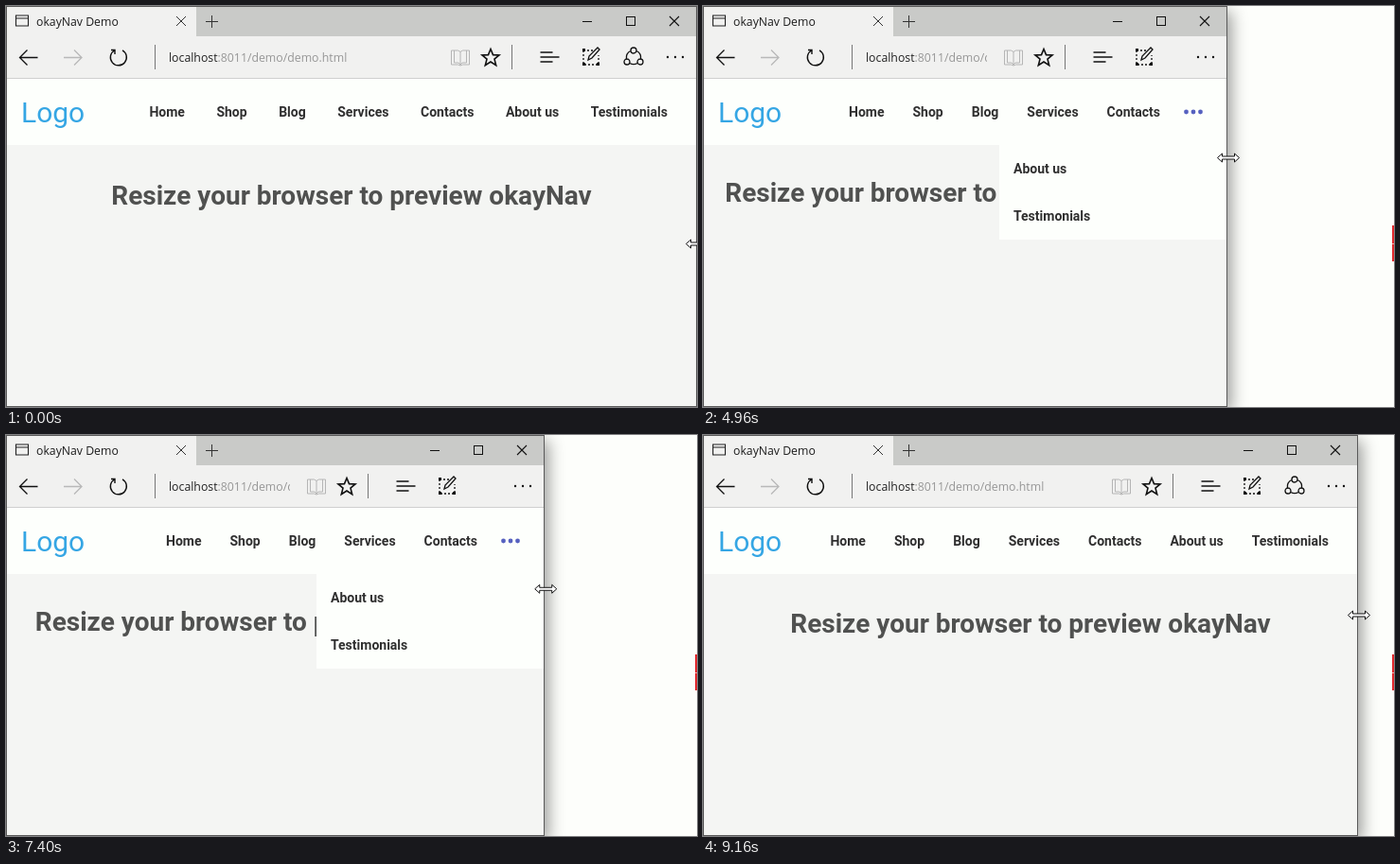
Animation of 730 by 424 pixels, one loop 9480 ms. Source, as an HTML page with a canvas:

```html
<!DOCTYPE html>
<html lang="en">
<head>
<meta charset="utf-8">
<title>okayNav Demo</title>
<style>
  html, body { margin: 0; width: 730px; height: 424px; overflow: hidden; background: #fdfefb; }
  canvas { display: block; }
</style>
</head>
<body>
<canvas id="stage" width="730" height="424"></canvas>
<script>
const c = document.getElementById('stage').getContext('2d');
const LOOP = 9480, MENU_OPEN = 3560;
const BODY = 'Roboto, sans-serif', UI = '"Open Sans", "Noto Sans", sans-serif';
const INK = '#2f2f2f', PANEL = '#fdfffc';
const ITEMS = ['Home', 'Shop', 'Blog', 'Services', 'Contacts', 'About us', 'Testimonials'];
// Window width from which 4, 5, 6 and 7 items fit beside the logo
const FITS = [0, 516, 600, 672];

const WIDTH = [[0, 730], [840, 730], [960, 714], [1360, 646], [1760, 596], [2300, 562], [2600, 554],
  [4960, 554], [5100, 545], [5500, 499], [5720, 488], [6560, 488], [6880, 527], [7480, 575],
  [7960, 618], [8440, 654], [8900, 684], [9160, 692]];
// Pointer: time, x relative to the window edge, y
const POINTER = [[0, 0, 251], [840, 0, 251], [1000, 4, 251], [2600, 4, 251], [2880, 4, 250],
  [3400, -36, 115], [3800, -36, 115], [4500, 1, 160], [4960, 1, 160], [5720, 1, 157],
  [6880, 1, 156], [7960, 1.5, 169], [9160, 1, 190]];

const ICONS = {
  cross: 'M-5-5L5 5M5-5L-5 5',
  plus: 'M-6.5 0H6.5M0-6.5V6.5',
  tab: 'M-6.5-5.5H6.5V5.5H-6.5ZM-6.5-2.5H6.5',
  back: 'M10 0H-9M-1-8L-9 0L-1 8',
  reload: 'M-4.5-7.5A8.5 8.5 0 1 0 4-7.6M-8-8H-4V-3.5',
  book: 'M-9.5-7H-2.5L0-5.5L2.5-7H9.5V8H2.5L0 9L-2.5 8H-9.5ZM0-5.5V9M-6.5-7V6H-2L0 8L2 6H6.5V-7',
  star: 'M0-9L2.5-2.9L9-2.6L4 1.6L5.7 8.2L0 4.5L-5.7 8.2L-4 1.6L-9-2.6L-2.5-2.9Z',
  hub: 'M-10-5H3M-10 0H10M-10 5H3',
  note: 'M-3 3L-2-1L7-10L9-8L1 1Z',
  share: 'M-3-6.5A8 8 0 0 0-7.5 2M3-6.5A8 8 0 0 1 7.5 2M-4 6.5A8 8 0 0 0 4 6.5' +
    'M3-7A3 3 0 1 1-3-7A3 3 0 1 1 3-7M-4 5A3 3 0 1 1-10 5A3 3 0 1 1-4 5M10 5A3 3 0 1 1 4 5A3 3 0 1 1 10 5'
};
const CURSORS = {
  resize: 'M-11.5 0L-6.5-4.5V-1.5H6.5V-4.5L11.5 0L6.5 4.5V1.5H-6.5V4.5Z',
  arrow: 'M0 0V16L4 12.5L6.5 18.5L9 17.5L6.5 11.5H11.5Z',
  hand: 'M-1.5 0Q0-1.5 1.5 0V6L9 8Q11 9 10.5 12L9 19H0L-5 12Q-6 9-1.5 11Z'
};

const clamp = v => Math.max(0, Math.min(1, v));
const smooth = v => v * v * (3 - 2 * v);

function track(keys, t, n = 1) {
  const i = keys.findIndex(k => k[0] > t);
  if (i < 0) return keys[keys.length - 1][n];
  const a = keys[i - 1], b = keys[i];
  return a[n] + (b[n] - a[n]) * (t - a[0]) / (b[0] - a[0]);
}

function box(x, y, w, h, color) {
  c.fillStyle = color;
  c.fillRect(x, y, w, h);
}

function text(s, x, y, font, color, align = 'left') {
  c.font = font;
  c.fillStyle = color;
  c.textAlign = align;
  c.fillText(s, x, y);
}

function shape(path, x, y, stroke, width = 1, fill) {
  const p = new Path2D(path);
  c.save();
  c.translate(x, y);
  if (fill) { c.fillStyle = fill; c.fill(p); }
  c.strokeStyle = stroke;
  c.lineWidth = width;
  c.stroke(p);
  c.restore();
}

function dots(x, y, step, r, color, angle = 0) {
  c.fillStyle = color;
  for (const k of [-step, 0, step]) {
    c.beginPath();
    c.arc(x + k * Math.cos(angle), y + k * Math.sin(angle), r, 0, 7);
    c.fill();
  }
}

function clipped(x, y, w, h, draw) {
  c.save();
  c.beginPath();
  c.rect(x, y, w, h);
  c.clip();
  draw();
  c.restore();
}

function drawFrame(w) {
  c.save();
  c.shadowColor = 'rgba(0,0,0,.4)';
  c.shadowBlur = 16;
  c.shadowOffsetX = 4;
  c.shadowOffsetY = 6;
  box(0, 0, w, 424, '#f4f5f3');
  c.restore();
  box(0, 0, w, 32, '#c9cac8');
  box(1, 1, 200, 31, '#f1f1f0');
  box(0, 32, w, 44, '#f1f1f0');
  box(0, 76, w, 1, '#cfcfcf');

  shape(ICONS.tab, 17, 15.5, '#222', 1.1);
  text('okayNav Demo', 32, 21, '12.25px ' + UI, '#1c1c1c');
  shape(ICONS.cross, 185, 16, '#333');
  shape(ICONS.plus, 217.5, 16.5, '#333');
  box(w - 121, 16, 10, 1, '#111');
  c.strokeStyle = '#111';
  c.lineWidth = 1;
  c.strokeRect(w - 74.5, 11.5, 9, 9);
  shape(ICONS.cross, w - 24, 16, '#111', 1.1);
}

function drawToolbar(w) {
  const book = Math.max(w - 250, 328), line = book + 54;
  shape(ICONS.back, 23.5, 54.5, '#111', 1.3);
  c.save();
  c.scale(-1, 1);
  shape(ICONS.back, -71, 54.5, '#b9b9b9', 1.3);
  c.restore();
  shape(ICONS.reload, 119, 54.5, '#111', 1.4);
  box(157, 41, 1, 26, '#777');
  clipped(160, 40, book - 188, 30, () => {
    const host = 'localhost', font = '12.3px ' + UI;
    text(host, 172, 59, font, '#222');
    text(':8011/demo/demo.html', 172 + c.measureText(host).width, 59, font, '#979797');
  });
  shape(ICONS.book, book, 54, '#b5b5b5', 1);
  shape(ICONS.star, book + 32, 54.5, '#111', 1.6);
  box(line, 41, 1, 26, '#777');

  // Buttons slide and fade in as room appears
  [['hub', 518, 40.5], ['note', 534, 84], ['share', 577, 129]].forEach(([name, from, dx]) => {
    const k = clamp((w - from) / 18), x = line + dx + 18 * (1 - k);
    c.globalAlpha = k;
    shape(ICONS[name], x, 54, '#111', name == 'hub' ? 1.4 : 1.3);
    if (name == 'note') {
      c.setLineDash([2, 2]);
      shape('M-8-7H3M-8-7V8H8V-2', x, 54, '#111', 1.3);
      c.setLineDash([]);
      for (const [a, b] of [[-9, -9], [-9, 6], [6, 6]]) box(x + a, 54 + b, 3, 3, '#111');
    }
    c.globalAlpha = 1;
  });
  dots(w - 23, 54, 8, 1.2, '#111');
}

function drawPage(w, t) {
  const bold = '700 14px ' + BODY, head = '700 28px ' + BODY;
  const count = 4 + FITS.slice(1).filter(f => w >= f).length;
  const full = count == ITEMS.length;
  const open = smooth(clamp((t - MENU_OPEN) / 400));

  box(1, 77, w - 2, 70, PANEL);
  text('Logo', 16, 123, '30px ' + BODY, '#35a6e4');

  const y = 210 - (730 - w) * .0185;
  const title = ['Resize your browser to preview', 'okayNav'];
  (w < 540 ? title : [title.join(' ')]).forEach((s, i) => text(s, w / 2, y + 40 * i, head, '#505150', 'center'));

  const gap = full && t < 2000 ? 33.5 : 30;
  let x = w - (full ? 31 : 71);
  for (const s of ITEMS.slice(0, count).reverse()) {
    text(s, x, 117, bold, INK, 'right');
    x -= c.measureText(s).width + gap;
  }
  if (full) return;

  dots(w - 36, 112, 8 - .5 * open, 2.4, open > .5 ? '#5661c0' : INK, Math.PI / 2 * (1 - open));
  if (!open) return;
  const left = w - 1 - 240 * open, hidden = ITEMS.slice(count);
  box(left, 147, 240, 50 * hidden.length, PANEL);
  hidden.forEach((s, i) => text(s, left + 15, 177 + 50 * i, bold, INK));
}

function drawClick(t) {
  const r = Math.min(19, (t - 1080) * .0393);
  if (r <= 0) return;
  if (r < 19) {
    c.strokeStyle = '#f47474';
    c.lineWidth = 2;
    c.beginPath();
    c.arc(729, 251, r, 0, 7);
    c.stroke();
  }
  box(728, 251 - r, 2, 2 * r, '#e2292e');
  box(728, 251, 2, 1, '#f6b3b0');
}

function drawPointer(w, t) {
  const dx = track(POINTER, t), y = track(POINTER, t, 2);
  const kind = dx > -5 ? 'resize' : dx < -28 && y < 126 ? 'hand' : 'arrow';
  shape(CURSORS[kind], w + dx, y + .5, '#111', 1, '#fff');
}

function render(now) {
  const t = now % LOOP, w = Math.round(track(WIDTH, t));
  box(0, 0, 730, 424, '#fdfefb');
  drawClick(t);
  drawFrame(w);
  clipped(0, 32, w, 392, () => {
    drawToolbar(w);
    drawPage(w, t);
  });
  c.strokeStyle = '#5a5a5a';
  c.lineWidth = 1;
  c.strokeRect(.5, .5, w - 1, 423);
  drawPointer(w, t);
}

const start = performance.now();
function tick() {
  render(performance.now() - start);
  requestAnimationFrame(tick);
}
tick();
</script>
</body>
</html>
```
